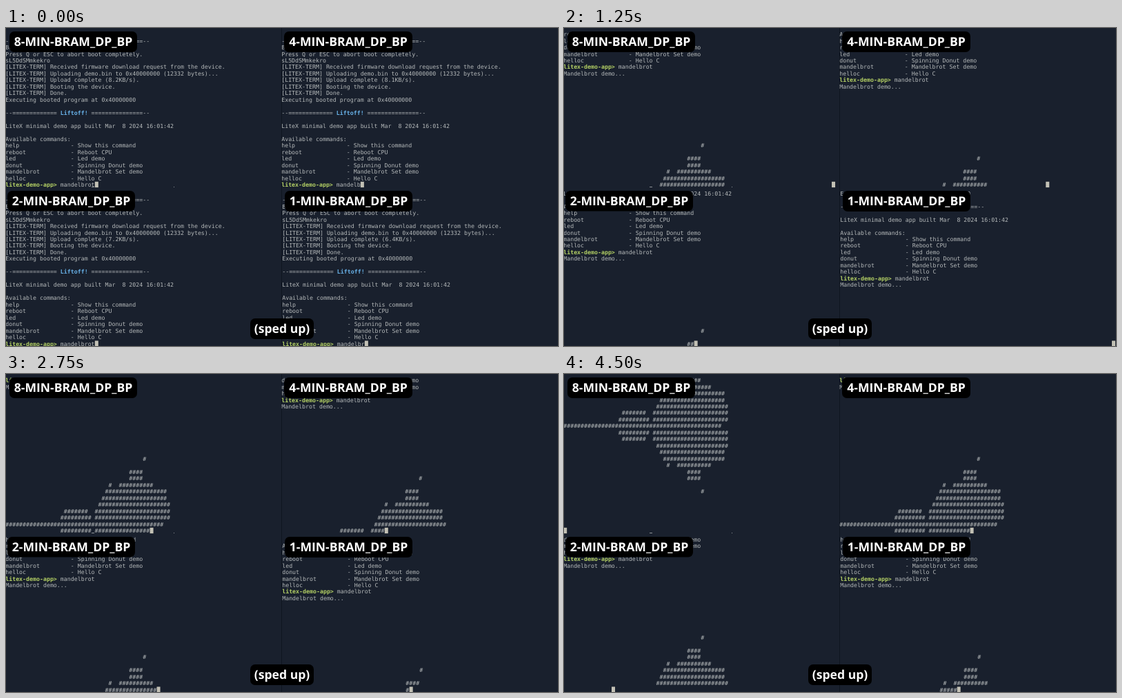
Write an HTML page that moves like this. It is 800 px wide and 461 px high and loops after 4620 ms.

```html
<!DOCTYPE html>
<html lang="en">
<head>
<meta charset="utf-8">
<title>Mandelbrot terminal comparison</title>
<style>
  html, body { margin: 0; width: 100%; height: 100%; overflow: hidden; background: #19202d; }
  svg { display: block; width: 800px; height: 461px; }
  .term { font: 8.28px "DejaVu Sans Mono", monospace; fill: #b5b9ba; text-rendering: geometricPrecision; }
  .term text, .term tspan { white-space: pre; }
  .prompt { font-weight: bold; fill: #b4d065; }
  .lift { font-weight: bold; fill: #69b3ea; }
  .label { font: bold 17.6px "Open Sans", "Noto Sans", sans-serif; fill: #fff; text-anchor: middle; text-rendering: geometricPrecision; }
</style>
</head>
<body>
<svg id="stage" viewBox="0 0 800 461"></svg>
<script>
const NS = "http://www.w3.org/2000/svg";
const XML = "http://www.w3.org/XML/1998/namespace";
const stage = document.getElementById("stage");
const LOOP = 4620, COLS = 80, FIRST = -10, LAST = 30;
const CHAR = 4.985, LINE = 9.475, BASE = 230, VISIBLE = 24;
const PROMPT_ROW = -12, WORD = "mandelbrot";

// Keys: [step, row, column] of the cursor; row 0 holds the topmost "#".
const panes = [
  { x: -0.8, y: 0, speed: "8.2", typed: 10, label: "8-MIN-BRAM_DP_BP", pill: [5, 5, 185, 30],
    keys: [[0.5, -10, 0], [6, 4, 42], [10, 6, 78], [16, 9, 26], [22, 11, 42], [30, 15, 32], [36, 26, 0]] },
  { x: 399.2, y: 0, speed: "8.1", typed: 7, label: "4-MIN-BRAM_DP_BP", pill: [403, 5, 186, 30],
    keys: [[1.5, -10, 0], [6, 2, 39], [10, 4, 60], [16, 6, 46], [22, 8, 30], [30, 10, 5], [36, 11, 38]] },
  { x: -0.8, y: 230.6, speed: "7.2", typed: 10, label: "2-MIN-BRAM_DP_BP", pill: [2, 236, 185, 29.5],
    keys: [[0.5, -10, 0], [6, -1, 35], [10, 2, 38], [16, 4, 39], [22, 5, 44], [30, 7, 27], [36, 8, 14]] },
  { x: 400.2, y: 230.6, speed: "6.4", typed: 8, label: "1-MIN-BRAM_DP_BP", pill: [404, 236, 185, 30],
    keys: [[1, -10, 0], [6, -5, 53], [10, -2, 79], [16, 2, 3], [22, 3, 37], [30, 4, 40], [36, 5, 34]] }
];

// Runs of "#" as start, length, by distance from the real axis.
const RUNS = [[0, 46], [16, 9, 26, 22], [17, 7, 26, 22], [27, 21], [28, 19], [29, 18],
  [30, 1, 33, 10], [36, 4], [36, 4], [], [40, 1]];

function setRow(row) {
  const cells = Array(COLS).fill(" ");
  const runs = RUNS[Math.abs(row - 10)] || [];
  for (let i = 0; i < runs.length; i += 2) cells.fill("#", runs[i], runs[i] + runs[i + 1]);
  return cells.join("");
}

// Work needed per cell: escape iterations plus a small constant.
function cellCost(row, col) {
  if (setRow(row)[col] === "#") return 52;
  const cr = -2 + col * 0.05, ci = (row - 10) * 0.1;
  let a = 0, b = 0, n = 0;
  while (n < 50 && a * a + b * b <= 4) {
    [a, b] = [a * a - b * b + cr, 2 * a * b + ci];
    n++;
  }
  return n + 2;
}

const work = [0];
for (let row = FIRST; row <= LAST; row++)
  for (let col = 0; col < COLS; col++) work.push(work[work.length - 1] + cellCost(row, col));

const cellIndex = (row, col) => (row - FIRST) * COLS + col;

function bootLog(speed) {
  const term = s => "[LITEX-TERM] " + s;
  const cmd = (name, text) => name.padEnd(19) + "- " + text;
  return [
    "--============== Boot ==================--",
    "Booting from serial...",
    "Press Q or ESC to abort boot completely.",
    "sL5DdSMmkekro",
    term("Received firmware download request from the device."),
    term("Uploading demo.bin to 0x40000000 (12332 bytes)..."),
    term(`Upload complete (${speed}KB/s).`),
    term("Booting the device."),
    term("Done."),
    "Executing booted program at 0x40000000",
    "",
    '--============= <tspan class="lift">Liftoff!</tspan> ===============--',
    "",
    "LiteX minimal demo app built Mar  8 2024 16:01:42",
    "",
    "Available commands:",
    cmd("help", "Show this command"),
    cmd("reboot", "Reboot CPU"),
    cmd("led", "Led demo"),
    cmd("donut", "Spinning Donut demo"),
    cmd("mandelbrot", "Mandelbrot Set demo"),
    cmd("helloc", "Hello C")
  ];
}

function add(parent, tag, attrs, text) {
  const el = document.createElementNS(NS, tag);
  for (const k in attrs) el.setAttribute(k, attrs[k]);
  if (text) el.textContent = text;
  parent.appendChild(el);
  return el;
}

const rect = (parent, x, y, width, height, fill, rx = 0) =>
  add(parent, "rect", { x, y, width, height, fill, rx });

function addLine(parent, x, y) {
  const el = add(parent, "text", { x, y });
  el.setAttributeNS(XML, "xml:space", "preserve");
  return el;
}

function addLabel([x, y, w, h], text, baseline) {
  rect(stage, x, y, w, h, "#000", 7);
  add(stage, "text", { class: "label", x: x + w / 2, y: baseline }, text);
}

function build() {
  rect(stage, 0, 0, 800, 461, "#19202d");
  rect(stage, 399, 0, 1, 461, "#0f151f");
  panes.forEach((p, i) => {
    const clip = add(stage, "clipPath", { id: "clip" + i });
    rect(clip, Math.max(0, p.x), p.y + 4.5, 400, 227, "#000");
    const g = add(stage, "g", { class: "term", "clip-path": `url(#clip${i})` });
    p.log = bootLog(p.speed);
    p.lines = Array.from({ length: VISIBLE }, (_, n) => addLine(g, p.x, p.y + BASE - n * LINE));
    p.cursor = rect(g, 0, p.y + 222.8, 5, 8.4, "#c3c1b5");
  });
  rect(stage, 124, 230, 4, 1, "#8d9296");
  rect(stage, 243, 230, 1, 1, "#8d9296");
  for (const p of panes) addLabel(p.pill, p.label, p.pill[1] + 21.2);
  addLabel([354, 421, 92, 30], "(sped up)", 442);
}

function cursorAt(p, step) {
  const keys = p.keys;
  if (step < keys[0][0]) {
    const typed = p.typed + Math.round((WORD.length - p.typed) * step / keys[0][0]);
    return { row: PROMPT_ROW, col: 16 + typed, typed };
  }
  let k = 0;
  while (k < keys.length - 2 && step >= keys[k + 1][0]) k++;
  const [s0, r0, c0] = keys[k], [s1, r1, c1] = keys[k + 1];
  const w0 = work[cellIndex(r0, c0)], w1 = work[cellIndex(r1, c1)];
  const done = w0 + (w1 - w0) * (step - s0) / (s1 - s0) + 1e-6;
  let i = cellIndex(r0, c0);
  while (work[i + 1] <= done) i++;
  return { row: FIRST + Math.floor(i / COLS), col: i % COLS, typed: WORD.length };
}

function lineText(p, row, cur) {
  if (row < PROMPT_ROW) return p.log[p.log.length + row - PROMPT_ROW] || "";
  if (row === PROMPT_ROW)
    return '<tspan class="prompt">litex-demo-app&gt;</tspan> ' + WORD.slice(0, cur.typed);
  if (row === PROMPT_ROW + 1) return "Mandelbrot demo...";
  const cells = setRow(row);
  return (row === cur.row ? cells.slice(0, cur.col) : cells).trimEnd();
}

function draw(step) {
  for (const p of panes) {
    const cur = cursorAt(p, step);
    p.lines.forEach((el, n) => { el.innerHTML = lineText(p, cur.row - n, cur); });
    p.cursor.setAttribute("x", p.x + cur.col * CHAR);
  }
}

let shown = -1;
function tick() {
  const t = performance.now() % LOOP;
  const step = Math.floor(t / 250) * 2 + (t % 250 >= 130 ? 1 : 0);
  if (step !== shown) draw(shown = step);
  requestAnimationFrame(tick);
}

build();
tick();
</script>
</body>
</html>
```
